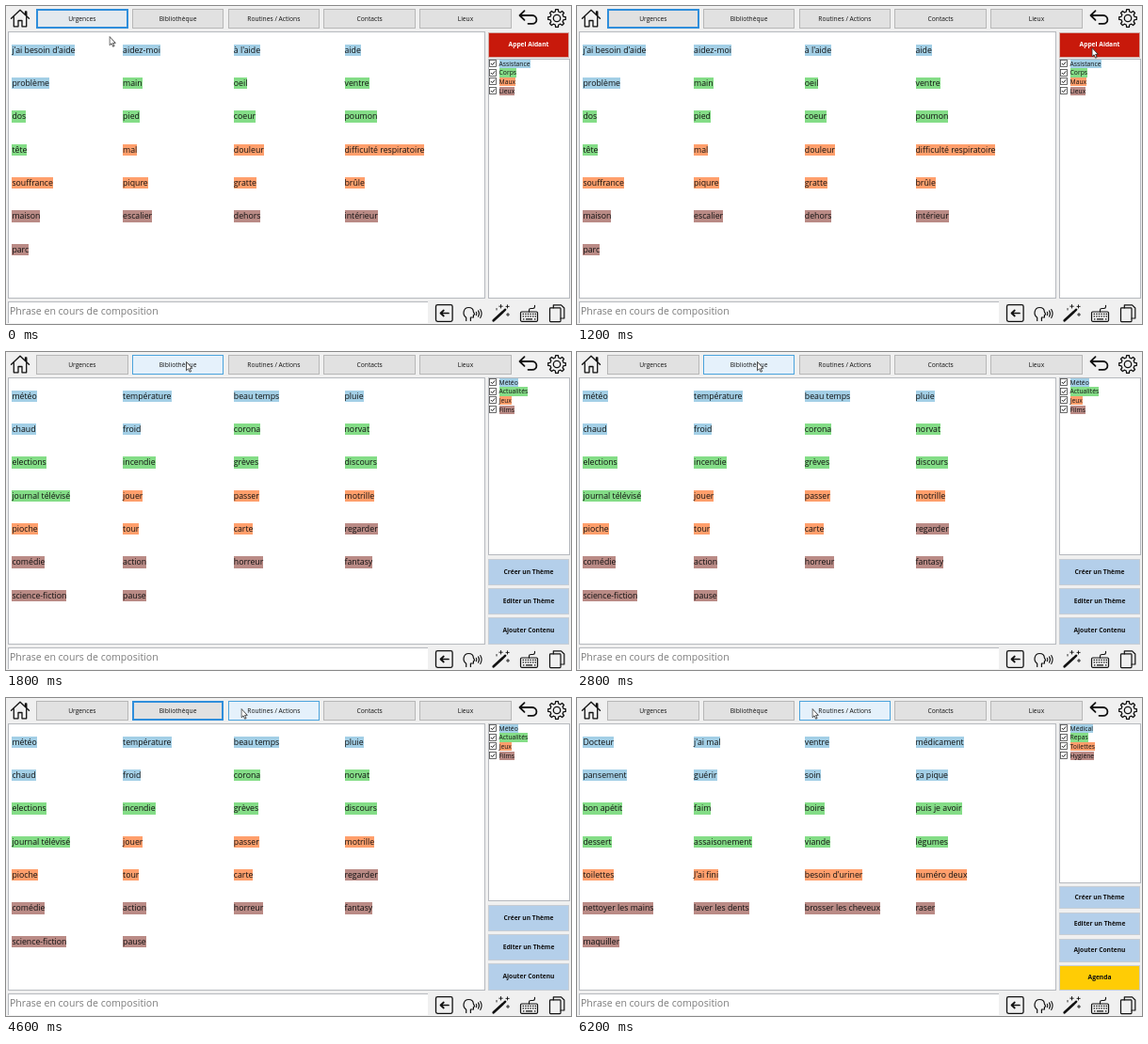
An HTML page that plays this animation: 600 by 338 pixels, repeating every 8 s.

```html
<!DOCTYPE html>
<html lang="fr">
<head>
<meta charset="utf-8">
<title>Aide à la communication</title>
<style>
html, body { margin: 0; width: 100%; height: 100%; overflow: hidden; background: #f0f0f0; }
body { font-family: "Open Sans", "Noto Sans", sans-serif; color: #111; }
#stage { position: relative; width: 600px; height: 338px; overflow: hidden; }
#stage div, #stage span, #stage svg { position: absolute; box-sizing: border-box; white-space: nowrap; }
.box { background: #fff; border: 1px solid #b6b9be; }
.tab { top: 2.5px; width: 97.5px; height: 21px; border: 1px solid #b7b7b7; background: #e1e1e1;
  font-size: 6.7px; line-height: 19px; text-align: center; }
.tab.focus { border: 2px solid #2f8edb; line-height: 17px; }
.tab.hover { background: #e5f1fb; border: 1px solid #4ba3dc; line-height: 19px; }
.word { font-size: 8.75px; line-height: 12.4px; height: 12.4px; }
.theme { font-size: 6.75px; line-height: 9.2px; height: 9.2px; left: 523.6px; }
.btn { left: 512px; width: 86px; border: 1px solid #c6cdd5; font-size: 6.66px; font-weight: 700; text-align: center; }
#entry { border-width: 1px 0 0 1px; }
#hint { left: 4px; top: 316px; font-size: 10.56px; line-height: 17px; color: #7c7c7c; }
</style>
</head>
<body>
<div id="stage"></div>
<script>
const LOOP = 8000;
const HUES = ['#a3cfe6', '#84dd87', '#ff9f6c', '#ba8b86'];
const TABS = ['Urgences', 'Bibliothèque', 'Routines / Actions', 'Contacts', 'Lieux'];
const BLUE = '#b4cfea', RED = '#c8190b', GOLD = '#ffcc05';

// words: one line per theme; list: top and bottom of the theme panel
const PAGES = [
  {
    list: [56, 311],
    themes: ['Assistance', 'Corps', 'Maux', 'Lieux'],
    words: [
      "j'ai besoin d'aide,aidez-moi,à l'aide,aide,problème",
      'main,oeil,ventre,dos,pied,coeur,poumon,tête',
      'mal,douleur,difficulté respiratoire,souffrance,piqure,gratte,brûle',
      'maison,escalier,dehors,intérieur,parc'
    ],
    buttons: [['Appel Aidant', 28, 54.5, RED]]
  },
  {
    list: [27, 216],
    themes: ['Météo', 'Actualités', 'Jeux', 'Films'],
    words: [
      'météo,température,beau temps,pluie,chaud,froid',
      'corona,norvat,elections,incendie,grèves,discours,journal télévisé',
      'jouer,passer,motrille,pioche,tour,carte',
      'regarder,comédie,action,horreur,fantasy,science-fiction,pause'
    ],
    buttons: [
      ['Créer un Thème', 219.5, 247.5, BLUE],
      ['Editer un Thème', 250.5, 278.5, BLUE],
      ['Ajouter Contenu', 282, 310.5, BLUE]
    ]
  },
  {
    list: [27, 197],
    themes: ['Médical', 'Repas', 'Toilettes', 'Hygiène'],
    words: [
      "Docteur,j'ai mal,ventre,médicament,pansement,guérir,soin,ça pique",
      'bon apétit,faim,boire,puis je avoir,dessert,assaisonement,viande,légumes',
      "toilettes,J'ai fini,besoin d'uriner,numéro deux",
      'nettoyer les mains,laver les dents,brosser les cheveux,raser,maquiller'
    ],
    buttons: [
      ['Créer un Thème', 199.5, 224, BLUE],
      ['Editer un Thème', 227.5, 252, BLUE],
      ['Ajouter Contenu', 256, 280.5, BLUE],
      ['Agenda', 284, 310.5, GOLD]
    ]
  }
];

// time, page, hovered tab (-1: none), pointer x, pointer y
const STEPS = [
  [0, 0, -1, 110, 32.5],
  [200, 0, -1, 235, 60],
  [400, 0, -1, 374, 84],
  [600, 0, -1, 564, 40],
  [800, 0, -1, 547, 44.5],
  [1600, 0, 1, 191.5, 10.5],
  [1800, 1, 1, 191.5, 10.5],
  [4600, 1, 2, 250, 11.5],
  [4800, 2, 2, 250, 11.5]
];

const stage = document.getElementById('stage');

function add(parent, tag, cls, style, text = '') {
  const el = document.createElement(tag);
  el.className = cls;
  Object.assign(el.style, style);
  el.textContent = text;
  parent.append(el);
  return el;
}

const px = n => n + 'px';
const rect = (x, y, x2, y2) => ({ left: px(x), top: px(y), width: px(x2 - x), height: px(y2 - y) });

function addSvg(parent, style, body) {
  const el = document.createElementNS('http://www.w3.org/2000/svg', 'svg');
  Object.assign(el.style, style);
  el.innerHTML = body;
  parent.append(el);
  return el;
}

function gear(cx, cy, teeth, outer, inner) {
  const pts = [];
  const step = Math.PI * 2 / teeth;
  for (let i = 0; i < teeth; i++) {
    for (const [k, r] of [[-0.3, inner], [-0.19, outer], [0.19, outer], [0.3, inner]]) {
      const a = (i + k) * step;
      pts.push((cx + r * Math.cos(a)).toFixed(2) + ' ' + (cy + r * Math.sin(a)).toFixed(2));
    }
  }
  return `<path d="M${pts.join('L')}Z"/><circle cx="${cx}" cy="${cy}" r="3.7"/>`;
}

function keys() {
  let d = '';
  for (let row = 0; row < 2; row++)
    for (let i = 0; i < 6; i++) d += `M${548.6 + i * 2.6} ${327.3 + row * 2.6}h1.4`;
  return d + 'M549 332.8h1.4M552 332.8h7M561 332.8h1.4';
}

function buildPage(page) {
  const root = add(stage, 'div', '', rect(0, 0, 600, 338));
  add(root, 'div', 'box', rect(511.5, page.list[0], 598.5, page.list[1]));
  let n = 0;
  page.words.forEach((line, g) => line.split(',').forEach(word => {
    const col = n % 4, row = Math.floor(n / 4);
    add(root, 'span', 'word', { left: px(6.4 + col * 117.7), top: px(40.6 + row * 35.35), background: HUES[g] }, word);
    n++;
  }));
  page.themes.forEach((name, i) => {
    const y = page.list[0] + 0.9 + i * 9.55;
    add(root, 'span', 'theme', { top: px(y), background: HUES[i] }, name);
    addSvg(root, { left: px(513), top: px(y + 0.4), width: px(8), height: px(8) },
      '<rect x=".5" y=".5" width="7" height="7" fill="#fff" stroke="#444" stroke-width=".8"/>' +
      '<path d="M1.9 4l1.5 1.6L6.2 2.3" fill="none" stroke="#222" stroke-width="1"/>');
  });
  for (const [label, y, y2, fill] of page.buttons) {
    const style = { top: px(y), height: px(y2 - y), lineHeight: px(y2 - y - 2), background: fill };
    if (fill === RED) Object.assign(style, { color: '#fff', borderColor: '#d3a8a2' });
    add(root, 'div', 'btn', style, label);
  }
  return root;
}

add(stage, 'div', 'box', rect(1.5, 27, 508.5, 311));
add(stage, 'div', 'box', rect(1.5, 314, 447.5, 337)).id = 'entry';
add(stage, 'span', '', {}, 'Phrase en cours de composition').id = 'hint';
const tabs = TABS.map((name, i) => add(stage, 'div', 'tab', { left: px(32 + i * 101.8) }, name));
const pages = PAGES.map(buildPage);

addSvg(stage, rect(0, 0, 600, 338), `
  <g fill="none" stroke="#111" stroke-width="1.3" stroke-linejoin="round" stroke-linecap="round">
    <path d="M5.5 13.2L15 4.200l9.500 9M20.500 9.200V6h1.300v4.500M8.300 11.500v10.300h4.700v-6.300h4v6.300h4.700V11.500"/>
    <path d="M550.500 5.200L545.500 10l5 4.800M546 10h13a4.400 4.400 0 0 1 0 8.800h-4.500" stroke-width="1.800"/>
    ${gear(585, 13, 8, 9.4, 7.2)}
    <rect x="456.500" y="317.700" width="17.600" height="17.600" rx="1.800"/>
    <path d="M470 326.500h-8.500M464.800 323.500l-3.300 3 3.300 3" stroke-width="1.700"/>
    <path d="M488.700 334.500v-3.300c-2.200-1.600-3-3.700-2.600-6 .5-3 2.600-4.700 5.300-4.700 3 0 4.800 1.700 5 4.400l1.300 2.900-1.300.7v2.500h-3v3.500" stroke-width="1.200"/>
    <path d="M499.300 325.300q1.100 1.700 0 3.400M501.500 323.900q2 3.100 0 6.200M503.700 322.500q2.700 4.500 0 9" stroke-width="1.100"/>
    <path d="M517.700 334.300l9.800-9" stroke-width="2.700"/>
    <path d="M528.500 324.300l1.700-1.600" stroke-width="2.400"/>
    <path d="M525.500 317.500v3.500M523.800 319.200h3.500M532.500 317.800v3.200M531 319.400h3.200M533 326.500v3M531.500 328h3M521 321.500v1.500" stroke-width=".9"/>
    <rect x="546.500" y="325" width="18" height="10.300" rx="1.200" stroke-width="1.200"/>
    <path d="M555.500 325v-2q0-1.500 2-1.500h2q2 0 2-1.700v-1.500" stroke-width="1.100"/>
    <path d="${keys()}" stroke-width="1.300" stroke-linecap="butt"/>
    <path d="M581.300 320.800v-3h8.300l3.200 3.200v11h-3.800" stroke-width="1.200"/>
    <rect x="577.500" y="320.900" width="11.500" height="14.700" rx=".8" stroke-width="1.200"/>
  </g>`);

const pointer = addSvg(stage, { left: 0, top: 0, width: '9px', height: '13px' },
  '<path d="M.6 .6v9.200l2.100-1.900 1.500 3.400 1.500-.7-1.500-3.200h2.700z" fill="#fff" stroke="#222" stroke-width=".8"/>');

function draw(t) {
  const [, page, hover, x, y] = STEPS.findLast(s => s[0] <= t);
  pages.forEach((el, i) => { el.style.visibility = i === page ? 'visible' : 'hidden'; });
  tabs.forEach((el, i) => {
    el.classList.toggle('focus', i === page);
    el.classList.toggle('hover', i === hover);
  });
  // hover tint still fading on the first tab
  tabs[0].style.background = t < 400 ? '#e3e9ee' : '';
  pointer.style.transform = `translate(${x - 0.6}px, ${y - 0.6}px)`;
}

const start = performance.now();
function tick() {
  draw((performance.now() - start) % LOOP);
  requestAnimationFrame(tick);
}
tick();
</script>
</body>
</html>
```
